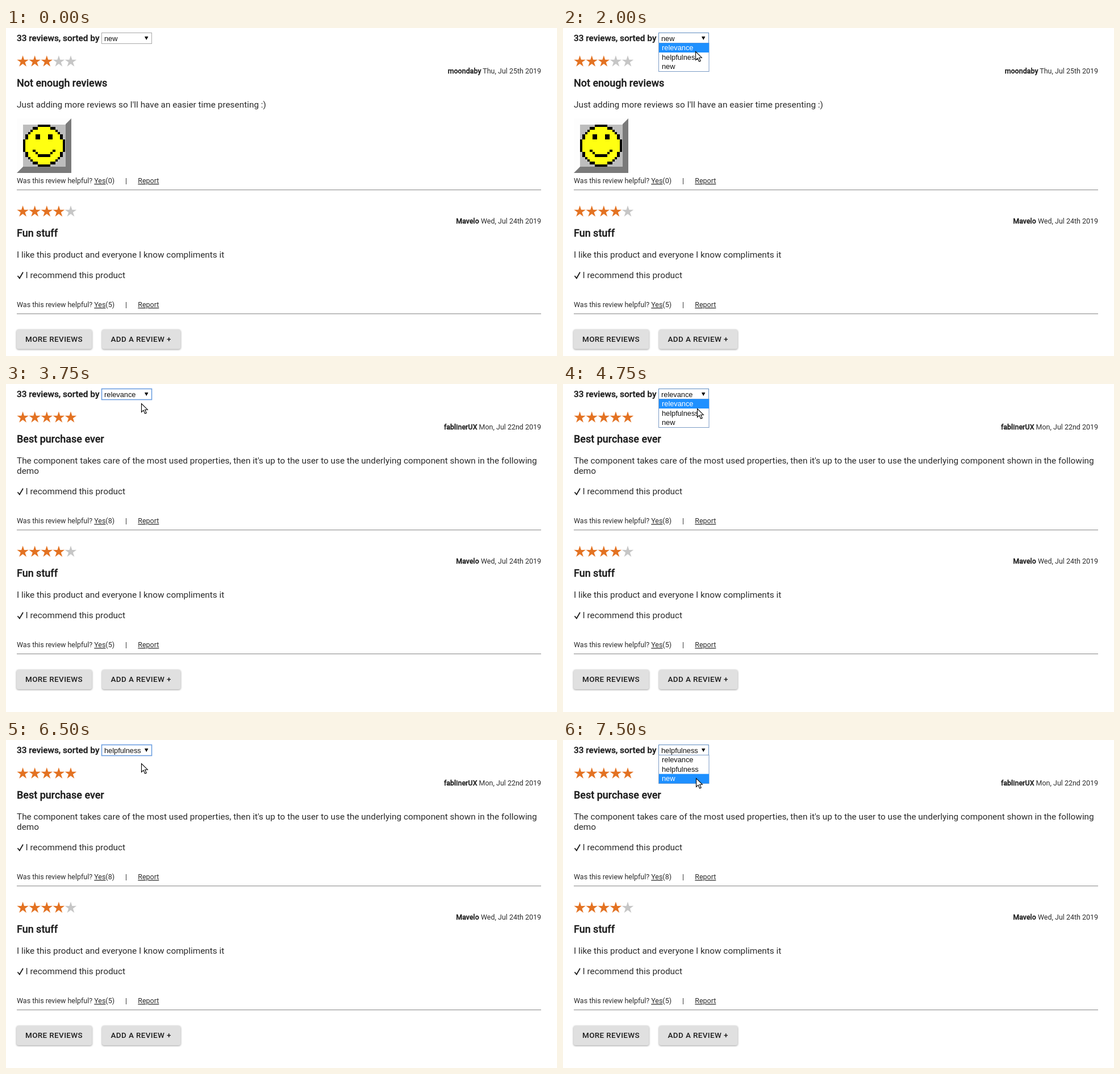
Write an HTML page that moves like this. It is 970 px wide and 577 px high and loops after 8000 ms.

```html
<!DOCTYPE html>
<html lang="en">
<head>
<meta charset="utf-8">
<title>Sorted reviews</title>
<style>
html, body { margin: 0; width: 100%; height: 100%; overflow: hidden; background: #fff; }
svg { display: block; width: 970px; height: 577px; font: 15.36px Roboto, sans-serif; fill: #2b2b2b; }
text { white-space: pre; }
.b { font-weight: 500; fill: #1c1c1c; stroke: #1c1c1c; stroke-width: .3px; }
.title { font-size: 17.97px; }
.small { font-size: 12.48px; }
.end { text-anchor: end; }
.u { text-decoration: underline; }
.select { font: 12.8px "Liberation Sans", Arial, sans-serif; fill: #111; }
.btn { font-size: 13.44px; font-weight: 500; letter-spacing: .02857em; fill: #1c1c1c; }
.box { fill: #e0e0e0; filter: drop-shadow(0 1px 1.5px rgba(0,0,0,.38)); }
</style>
</head>
<body>
<svg id="stage" viewBox="0 0 970 577"></svg>
<script>
const stage = document.getElementById('stage');
const LOOP = 8000, options = ['relevance', 'helpfulness', 'new'];
const NEW = 2, REL = 0, HELP = 1;

// time, cursor x, cursor y, chosen option, highlighted option (-1: list closed)
const steps = [
  [250, 298, 88, NEW, -1], [500, 270, 54, NEW, -1], [750, 243, 26, NEW, -1],
  [1000, 234, 18, NEW, -1], [1250, 234, 18, NEW, NEW], [1500, 233, 28, NEW, REL],
  [1750, 233, 37, NEW, REL], [2000, 233, 41, NEW, REL], [2500, 233, 41, REL, -1],
  [2750, 235, 46, REL, -1], [3000, 237, 50, REL, -1], [3250, 238, 50, REL, -1],
  [3500, 238, 45, REL, -1], [3750, 238, 34, REL, -1], [4000, 237, 22, REL, -1],
  [4250, 236, 18, REL, REL], [4500, 236, 31, REL, REL], [4750, 236, 43, REL, REL],
  [5000, 238, 41, REL, HELP], [5500, 238, 41, HELP, -1], [6750, 237, 27, HELP, -1],
  [7000, 235, 18, HELP, HELP], [7250, 234, 43, HELP, HELP], [7500, 234, 67, HELP, NEW]
];

const fun = { stars: 4, user: 'Mavelo', date: 'Wed, Jul 24th 2019', title: 'Fun stuff',
  body: ['I like this product and everyone I know compliments it'], recommend: true, yes: 5 };
const few = { stars: 3, user: 'moondaby', date: 'Thu, Jul 25th 2019', title: 'Not enough reviews',
  body: ["Just adding more reviews so I'll have an easier time presenting :)"], picture: true, yes: 0 };
const best = { stars: 5, user: 'fablinerUX', date: 'Mon, Jul 22nd 2019', title: 'Best purchase ever',
  body: ["The component takes care of the most used properties, then it's up to the user to use the underlying component shown in the following", 'demo'],
  recommend: true, yes: 8 };

const text = (x, y, s, cls = '') => `<text x="${x}" y="${y}" class="${cls}">${s}</text>`;
const rect = (x, y, w, h, fill, more = '') =>
  `<rect x="${x}" y="${y}" width="${w}" height="${h}" fill="${fill}" ${more}/>`;

function star(cx, cy, fill) {
  const pts = Array.from({ length: 10 }, (_, i) => {
    const r = i % 2 ? 4.1 : 10.8, a = i * Math.PI / 5;
    return (cx + r * Math.sin(a)).toFixed(2) + ',' + (cy - r * Math.cos(a)).toFixed(2);
  });
  return `<polygon points="${pts.join(' ')}" fill="${fill}"/>`;
}

function smiley(x, y) {
  const inset = [6, 4, 3, 2, 1, 1, 0, 0, 0, 0, 0, 1, 1, 2, 3, 4, 6];
  const cell = (c, r, w, h, fill) => rect(c, r, w, h, fill);
  let out = '';
  inset.forEach((e, r) => {
    const edge = Math.max(e + 1, inset[r - 1] ?? 9, inset[r + 1] ?? 9);
    out += cell(e, r, 17 - 2 * e, 1, '#000');
    if (edge < 9) out += cell(edge, r, 17 - 2 * edge, 1, '#ff1');
  });
  for (const c of [5, 10]) out += cell(c, 4, 2, 2, '#000');
  for (const [c, r, w] of [[4, 10, 1], [12, 10, 1], [5, 11, 1], [11, 11, 1], [6, 12, 5]])
    out += cell(c, r, w, 1, '#000');
  return `<g transform="translate(${x} ${y})">` + rect(0, 0, 96, 96, '#fdfdfd') +
    '<path d="M96 0V96H0L11 85H86V10z" fill="#7a7a7a"/>' + rect(11, 11, 75, 74, '#bdbdbd') +
    `<g transform="translate(11 11) scale(4.35)" shape-rendering="crispEdges">${out}</g></g>`;
}

// Draws one review and returns its markup and the height of its rule.
function review(top, r) {
  const rule = top + (r.picture ? 285 : 239 + 18.2 * (r.body.length - 1));
  let out = '';
  for (let i = 0; i < 5; i++)
    out += star(29.6 + 21.1 * i, top + 59, i < r.stars ? '#e37222' : '#c6c6c6');
  out += text(942, top + 80, `<tspan class="b">${r.user}</tspan> ${r.date}`, 'small end');
  out += text(19, top + 103, r.title, 'b title');
  r.body.forEach((line, i) => out += text(19, top + 139.8 + 18.4 * i, line));
  if (r.picture) out += smiley(19, top + 159);
  if (r.recommend) {
    out += `<path d="M20.5 ${rule - 67}l3.4 4.3L30 ${rule - 73.5}" fill="none" stroke="#1c1c1c" stroke-width="1.8"/>`;
    out += text(34.5, rule - 62.8, 'I recommend this product');
  }
  out += text(19, rule - 12, `Was this review helpful? <tspan class="u">Yes</tspan>(${r.yes})`, 'small');
  out += text(210, rule - 12, '|', 'small') + text(232.3, rule - 12, 'Report', 'small u');
  out += rect(19, Math.round(rule) - 1, 923, 1, '#a2a2a2') + rect(19, Math.round(rule), 923, 1, '#dedede');
  return [out, rule];
}

function button(x, y, w, label) {
  return `<rect class="box" x="${x}" y="${y}" width="${w}" height="34.6" rx="3.8"/>` +
    text(x + 15.5, y + 21.8, label, 'btn');
}

function sorter(chosen, hover, focused) {
  const open = hover >= 0;
  let out = rect(168.5, 8.5, 88, 19, '#fff', open ? 'stroke="#5f8cc0"'
    : focused ? 'stroke="#6d9fe0" stroke-width="1.6"' : 'stroke="#a9a9a9"');
  out += text(173, 23, options[chosen], 'select') + '<path d="M244 15h6.4l-3.2 6z" fill="#000"/>';
  if (!open) return out;
  out += rect(168.5, 26.5, 88.5, 50, '#fff', 'stroke="#7c9cc6"');
  options.forEach((name, i) => {
    const y = 26.5 + 16.6 * i;
    if (i === hover) out += rect(169, y, 88, 16.6, '#1e90ff');
    out += `<text x="174" y="${y + 12.6}" class="select" ${i === hover ? 'style="fill:#fff"' : ''}>${name}</text>`;
  });
  return out;
}

const cursor = (x, y) => `<path transform="translate(${x + .5} ${y + .5})"
  d="M0 0V15l3.5-3.3 2.6 5.8 2.6-1.1-2.6-5.7h4.7z" fill="#fff" stroke="#000" stroke-width="1.1"/>`;

function scene(step) {
  const [, x, y, chosen, hover] = step || [0, 0, 0, NEW, -1];
  const [first, rule1] = review(0, chosen === NEW ? few : best);
  const [second, rule2] = review(rule1 - 21, fun);
  return text(19, 23.3, '33 reviews, sorted by', 'b') + first + second +
    button(18.5, rule2 + 27.2, 133, 'MORE REVIEWS') + button(169, rule2 + 27.2, 138.5, 'ADD A REVIEW +') +
    sorter(chosen, hover, chosen !== NEW) + (step ? cursor(x, y) : '');
}

let shown = null;
function draw(now) {
  const t = now % LOOP;
  const step = steps.findLast(s => s[0] <= t);
  if (step !== shown) stage.innerHTML = scene(shown = step);
  requestAnimationFrame(draw);
}
draw(performance.now());
</script>
</body>
</html>
```
